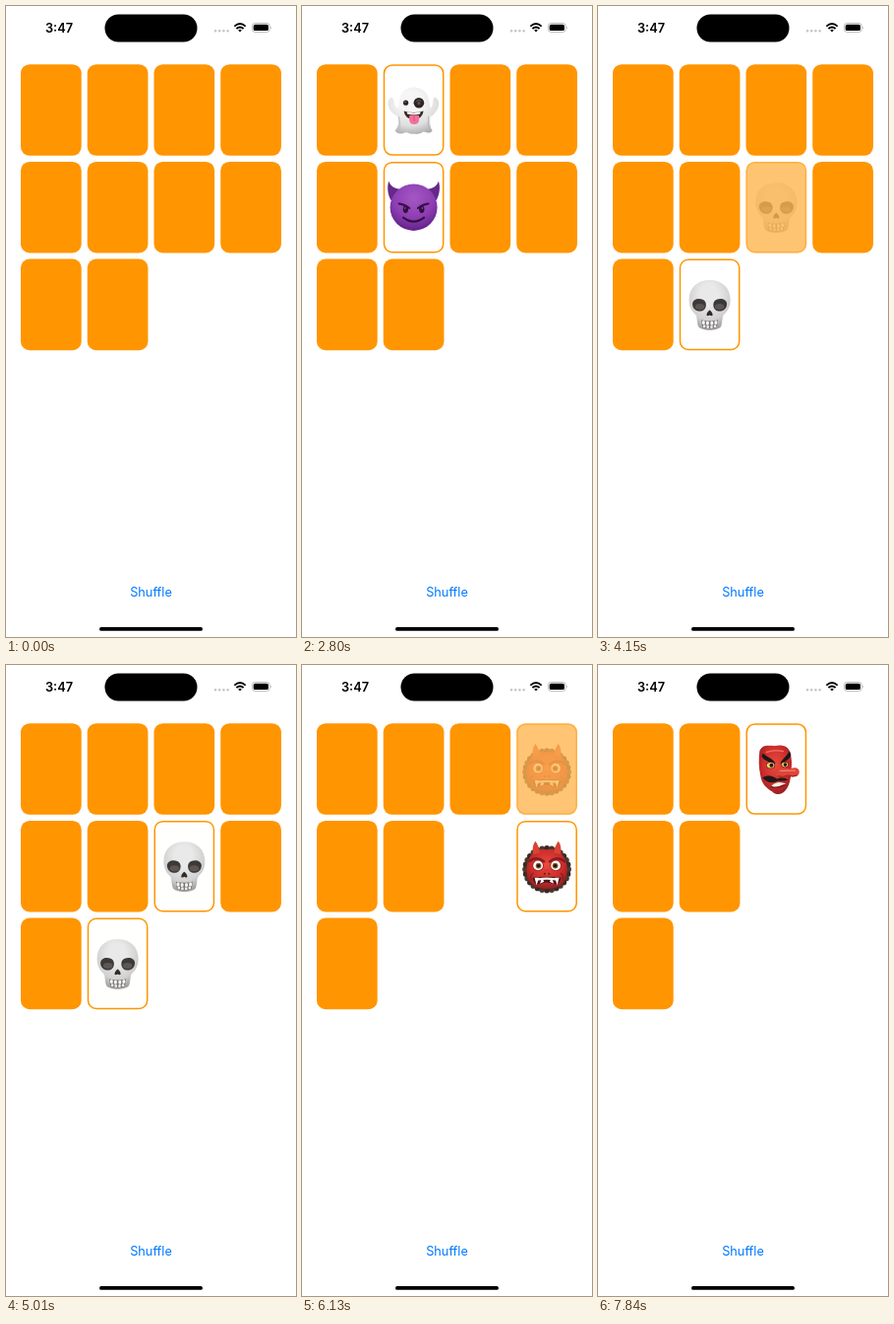
These frames come from a looping animation (295 by 640 pixels, 8000 ms). An HTML page:

```html
<!DOCTYPE html>
<html lang="en">
<head>
<meta charset="utf-8">
<title>Card matching game</title>
<style>
  html, body { margin: 0; width: 100%; height: 100%; overflow: hidden; background: #fff; }
  svg { display: block; width: 100vw; height: 100vh; }
  text { font-family: Inter, "Liberation Sans", sans-serif; font-size: 12.75px; text-anchor: middle; }
</style>
</head>
<body>
<svg id="stage" viewBox="0 0 295 640">
  <defs>
    <radialGradient id="sheet" cx=".45" cy=".3" r=".75">
      <stop offset=".3" stop-color="#f6f6f6"/><stop offset=".7" stop-color="#dededf"/><stop offset="1" stop-color="#aaa8aa"/>
    </radialGradient>
    <radialGradient id="bone" cx=".48" cy=".3" r=".72">
      <stop offset=".3" stop-color="#e9e9ea"/><stop offset=".7" stop-color="#d2d1d2"/><stop offset="1" stop-color="#99989a"/>
    </radialGradient>
    <radialGradient id="purple" cx=".5" cy=".3" r=".72">
      <stop offset="0" stop-color="#a458c4"/><stop offset=".6" stop-color="#8d3db1"/><stop offset="1" stop-color="#5f2084"/>
    </radialGradient>
    <radialGradient id="red" cx=".5" cy=".4" r=".65">
      <stop offset="0" stop-color="#e94a3d"/><stop offset=".6" stop-color="#cc2d2b"/><stop offset="1" stop-color="#8d1c20"/>
    </radialGradient>
  </defs>

  <text x="54" y="26.5" font-weight="600">3:47</text>
  <rect x="100.5" y="8.5" width="94" height="28" rx="14"/>
  <path d="M213 25.3h13" stroke="#c4c4c6" stroke-width="2.6" stroke-linecap="round" stroke-dasharray="0 4.2"/>
  <g fill="none" stroke="#000" stroke-width="1.9">
    <path d="M232.3 20.6Q238 15.6 243.7 20.6M234.4 23Q238 19.9 241.6 23"/>
    <path d="M236.2 24.4Q238 23 239.8 24.4L238 26.6Z" fill="#000" stroke="none"/>
  </g>
  <rect x="250.4" y="17.4" width="17.8" height="9" rx="2.9" fill="none" stroke="#aaa" stroke-width=".8"/>
  <rect x="251.7" y="18.7" width="15.2" height="6.4" rx="1.7"/>
  <path d="M269.3 20.4q1.6 1.5 0 3z" fill="#aaa"/>

  <g id="cards"></g>

  <text x="147.5" y="599.3" fill="#007aff">Shuffle</text>
  <rect x="95" y="630" width="105" height="3.8" rx="1.9"/>
</svg>

<script>
const LOOP = 8000;
const ORANGE = '#ff9500';
const CARD = { x: 15, y: 59.2, w: 61.7, h: 92.6, dx: 67.75, dy: 98.7 };

const ellipse = (x, y, rx, ry, fill) => `<ellipse cx="${x}" cy="${y}" rx="${rx}" ry="${ry}" fill="${fill}"/>`;
const dot = (x, y, r, fill) => ellipse(x, y, r, r, fill);
const shape = (d, fill) => `<path d="${d}" fill="${fill}"/>`;
const line = (d, color, width) =>
  `<path d="${d}" fill="none" stroke="${color}" stroke-width="${width}" stroke-linecap="round" stroke-linejoin="round"/>`;
const mirrored = art => art + `<g transform="scale(-1 1)">${art}</g>`;

// Curly mane: overlapping tufts around the face.
const mane = Array.from({ length: 28 }, (_, i) => {
  const a = i / 28 * Math.PI * 2;
  return dot((22 * Math.cos(a)).toFixed(1), (3 + 21.3 * Math.sin(a)).toFixed(1), 2.9, i % 2 ? '#3a2a24' : '#4d382e');
}).join('');

// Faces are drawn around the centre of their card.
const faces = {
  ghost:
    shape('M-15-8C-14-18-8-23 0-23C8-23 15-18 16-8L17-2C20-3 19-8 20-11C21-14 23-13 24-11C27-8 26 1 17 7C16 14 17 18 19 21C16 25 12 22 10 22C7 24 3 25 0 24C-4 25-6 22-9 23C-13 25-17 24-19 21C-16 17-15 13-16 7C-25 2-28-6-25-11C-23-14-21-13-20-10C-19-7-20-3-16-2Z', 'url(#sheet)') +
    line('M-15 7Q-13 14-15 20M15 7Q14 14 16 20', '#b9b8ba', 1) +
    dot(-8, -7.3, 2.6, '#2b2523') + dot(-8.6, -8.2, .6, '#aaa') +
    dot(5.3, -7.3, 5.3, '#2b2523') + line('M2.6-8.6A3 3 0 0 1 7.5-9', '#7b706d', .8) + dot(5.3, -6.8, 1.6, '#5d514e') +
    shape('M-10 1Q0 4 10 1Q9 9 0 9.5Q-9 9-10 1Z', '#3a2826') +
    shape('M-7 2.1Q0 3.7 7 2.1L6.5 4Q0 5-6.5 4Z', '#fff') +
    shape('M-4.5 5.5Q0 3.8 5.5 5.5V10Q5 14.5 .5 14.5Q-4 14.5-4.5 10Z', '#f0719b') +
    line('M.5 6V11', '#cf4c79', .8),

  devil:
    mirrored(shape('M-23-7C-27-14-27-22-25.3-26.5C-23-20-17-18.5-11-18.5Z', '#662889')) +
    ellipse(0, 0, 24, 23.7, 'url(#purple)') +
    mirrored(
      line('M-15-3.8Q-9-3-4.3.8', '#38104d', 2) +
      ellipse(-8.2, 2, 2.7, 3.7, '#32103f') + dot(-8.8, .8, .7, '#a579b5')) +
    line('M-10.5 10.5Q0 18.5 10.5 10.5', '#32103f', 2.1),

  skull:
    shape('M-21-5C-21-18-12-25 0-25C12-25 21-18 21-5C21 2 18 7 14 10.5C12.5 13 13.2 18 11.5 22C8 27-8 27-11.5 22C-13.2 18-12.5 13-14 10.5C-18 7-21 2-21-5Z', 'url(#bone)') +
    mirrored(
      shape('M-17.5-1C-17-6-11-7-6.5-5C-2.5-3-3 4-7 6C-12 8-17.5 5-17.5-1Z', '#3b3837') +
      ellipse(-10, 2, 4.8, 3, '#5b5653')) +
    shape('M0 5.5C2 6.5 3.8 10 2.7 11.2Q1 11.5 0 10.5Q-1 11.5-2.7 11.2C-3.8 10-2 6.5 0 5.5Z', '#2e2a29') +
    shape('M-8.5 15.5Q0 17.5 8.5 15.5L7.5 23Q0 25.5-7.5 23Z', '#777475') +
    line('M-6.3 17.6V18.7M-2.2 18.2V19.3M2.2 18.2V19.3M6.3 17.6V18.7', '#f4f3f0', 3) +
    line('M-5.5 21.7V22M-1.9 22.5V22.8M1.9 22.5V22.8M5.5 21.7V22', '#eeedea', 2.7),

  ogre:
    mane + ellipse(0, 3, 20.8, 20.8, '#3f2d26') +
    shape('M-18-8C-14-17-7-18 0-17C7-18 14-17 18-8C23 2 21 14 14 19C8 24-8 24-14 19C-21 14-23 2-18-8Z', 'url(#red)') +
    mirrored(
      shape('M-14-12C-15-18-14-23-11.5-25.5C-9.5-22-7.5-19-7-14Z', '#d74435') +
      line('M-18-5Q-11-11-3-5', '#861a20', 2.4) +
      dot(-9, -.8, 5.6, '#8f1f1f') + dot(-9, -.8, 4.9, '#fff') +
      dot(-8.5, -.6, 2.9, '#8b542b') + dot(-8.5, -.6, 1.7, '#181314') +
      line('M-14 7Q-18 10-16 14', '#8e1c20', 1.2)) +
    ellipse(0, 6, 5.3, 3.4, '#d93a31') + dot(-2.3, 7.5, 1, '#681519') + dot(2.3, 7.5, 1, '#681519') +
    shape('M-14.5 11.5Q0 9.5 14.5 11.5Q13 19 7 18Q0 14.5-7 18Q-13 19-14.5 11.5Z', '#4b1518') +
    line('M-9 13.2Q0 11.7 9 13.2', '#f7f3e8', 2.3) +
    mirrored(shape('M-12.5 11.5L-8 11.5L-10.5 19Z', '#fff') + shape('M-7 17.5L-5 11.5L-2.8 15.6Z', '#fff')),

  tengu:
    shape('M-17-18C-15-25-8-24-2-23.5C5-25 12-24 14-17C16-10 16-5 15 2C15 10 13 18 9 22C6 26 0 27-4 23C-11 19-15 14-16 7C-18-2-18-10-17-18Z', 'url(#red)') +
    line('M-10-17Q-3-20 7-18', '#ef6a58', 1.4) +
    shape('M-13.5-16C-9-12-3-10-.5-5.5C-6-6.5-12-8-15-13Z', '#1c1717') +
    shape('M13.5-18.5C11-13 6.5-11 4-5.5C8-7 13-9 15-14Z', '#1c1717') +
    ellipse(-5.8, -3.8, 4.6, 3.5, '#701619') + ellipse(-5.8, -3.7, 3.9, 2.8, '#f5d467') + dot(-4.9, -3.7, 2, '#211817') +
    ellipse(8.8, -4.5, 3.8, 3, '#701619') + ellipse(8.8, -4.4, 3.1, 2.4, '#f5d467') + dot(9.1, -4.4, 1.8, '#211817') +
    shape('M-14 9C-9 5-4 7 1 10Q7 7 12 11Q7 13 2 12C-4 15-9 14-14 9Z', '#211817') +
    shape('M-5 17Q1 11 10 15Q5 16 2 18Q-2 20-5 17Z', '#f6eee6') +
    line('M-5 18Q1 20 9 16', '#721719', 1.3) +
    shape('M0 2C3-2 9-1 14 0C20-3 25 0 23 5C21 9 15 8 12 7C7 10 2 9 0 6Z', '#df4438') +
    line('M4 1.8Q12 1.5 19 1.7', '#f48370', 1.3) +
    line('M2 7.3Q7 9 12 6.5Q16 8.5 21 6.5', '#941f23', 1)
};

// Each tap animates in evenly spaced steps from begin to end.
const taps = [
  { begin: 1090, end: 1800, steps: 8 },
  { begin: 1900, end: 2700, steps: 9 },
  { begin: 3090, end: 3840, steps: 8 },
  { begin: 4030, end: 4750, steps: 8 },
  { begin: 5010, end: 5770, steps: 8, lead: 8 },
  { begin: 6010, end: 6750, steps: 8 },
  { begin: 7020, end: 7740, steps: 8 }
];

// Which tap opens and closes each turned card, by position in the grid.
const turns = {
  1: { face: 'ghost', open: 0, close: 2 },
  2: { face: 'tengu', open: 6 },
  3: { face: 'ogre', open: 5, close: 6, matched: true },
  5: { face: 'devil', open: 1, close: 2 },
  6: { face: 'skull', open: 3, close: 4, matched: true },
  7: { face: 'ogre', open: 4, close: 6, matched: true },
  9: { face: 'skull', open: 2, close: 4, matched: true }
};

// Critically damped spring with a response of 0.55 s.
function spring(ms) {
  const x = 2 * Math.PI / 550 * ms;
  return 1 - (1 + x) * Math.exp(-x);
}

function progress(index, time) {
  const tap = taps[index];
  if (!tap || time < tap.begin) return 0;
  if (time >= tap.end) return 1;
  const step = (tap.end - tap.begin) / (tap.steps - 1);
  const elapsed = Math.floor((time - tap.begin) / step) * step;
  return spring(elapsed + (tap.lead ?? 30));
}

function cardMarkup(index) {
  const { x, y, w, h, dx, dy } = CARD;
  const cx = x + w / 2 + dx * (index % 4);
  const cy = y + h / 2 + dy * Math.floor(index / 4);
  const rect = (inset, attrs) =>
    `<rect x="${inset - w / 2}" y="${inset - h / 2}" width="${w - 2 * inset}" height="${h - 2 * inset}" rx="${9 - inset}" ${attrs}/>`;
  const turn = turns[index];
  const front = turn
    ? `<g opacity="0">${rect(.75, `fill="#fff" stroke="${ORANGE}" stroke-width="1.5"`)}${faces[turn.face]}</g>`
    : '';
  return `<g transform="translate(${cx} ${cy})">${front}${rect(0, `fill="${ORANGE}"`)}</g>`;
}

const deck = document.getElementById('cards');
deck.innerHTML = Array.from({ length: 10 }, (_, i) => cardMarkup(i)).join('');

function draw(time) {
  for (const [index, turn] of Object.entries(turns)) {
    const card = deck.children[index];
    const [front, cover] = card.children;
    const closed = progress(turn.close, time);
    const shown = progress(turn.open, time) - closed;
    front.setAttribute('opacity', shown);
    cover.setAttribute('opacity', 1 - shown);
    card.setAttribute('opacity', turn.matched ? 1 - closed : 1);
  }
}

const start = performance.now();
function tick() {
  draw((performance.now() - start) % LOOP);
  requestAnimationFrame(tick);
}
tick();
</script>
</body>
</html>
```
